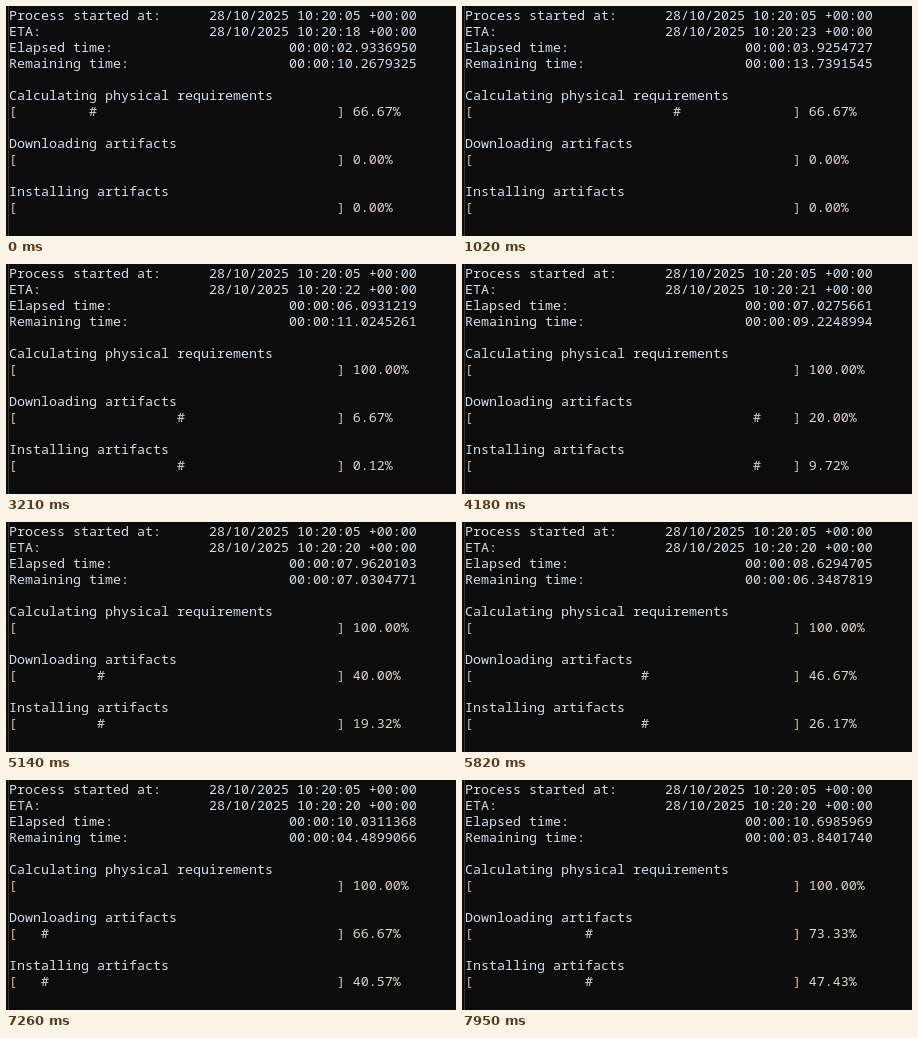
Write an HTML page that moves like this. It is 450x230 px and loops after 8 s.

```html
<!DOCTYPE html>
<html lang="en">
<head>
<meta charset="utf-8">
<title>Install progress</title>
<style>
  html, body { margin: 0; width: 100%; height: 100%; overflow: hidden; background: #0c0c0c; }
  svg { display: block; width: 450px; height: 230px; background: #0c0c0c; }
  text {
    font: 13.3333px "Noto Sans Mono", "DejaVu Sans Mono", monospace;
    font-variant-ligatures: none;
    white-space: pre;
    fill: #d2dee8;
  }
  .bar { fill: #e0d6c6; }
  .bracket { fill: #dcb98c; }
  #cursor { fill: #fff; mix-blend-mode: difference; }
</style>
</head>
<body>
<svg id="screen" viewBox="0 0 450 230">
  <rect x="2" width="1" height="230" fill="#333"/>
</svg>
<script>
const LOOP = 8000;
const REFRESH_MS = 68.53;
const BAR_WIDTH = 40;
const ARTIFACTS = 15;
const START_SECOND = 5.72;
const CALCULATED_AT = 4.3;
const DOWNLOADED_AT = 6.08;
const INSTALL_FROM = 6.0814;
const INSTALL_RATE = 1540.8; // thousandths of an artifact per second

// Elapsed seconds at a few refreshes; the clock runs evenly in between
const CLOCK = [[0, 2.933695], [33, 5.115606], [47, 6.0931219], [116, 10.6985969]];

const svg = document.getElementById("screen");
function make(tag, attrs, parent = svg) {
  const node = document.createElementNS(svg.namespaceURI, tag);
  for (const name in attrs) node.setAttribute(name, attrs[name]);
  return parent.appendChild(node);
}
const rows = Array.from({ length: 13 }, (_, i) => make("text", { x: 3, y: 14 + i * 16 }));
const cursor = make("rect", { id: "cursor", x: 3, y: 13, width: 8, height: 4 });

function elapsedAt(refresh) {
  const i = Math.max(1, CLOCK.findIndex(([r]) => r >= refresh));
  const [[r0, s0], [r1, s1]] = [CLOCK[i - 1], CLOCK[i]];
  return s0 + (s1 - s0) * (refresh - r0) / (r1 - r0);
}

// Downloads come in quickly at first, then slow down
function downloadedAt(elapsed) {
  const t = elapsed - DOWNLOADED_AT;
  return t < 0 ? 0 : Math.floor(1 + 3 * t - 0.15 * t * t) / ARTIFACTS;
}

function installedAt(elapsed) {
  const thousandths = Math.round((elapsed - INSTALL_FROM) * INSTALL_RATE);
  return Math.max(0, thousandths) / (ARTIFACTS * 1000);
}

const plain = text => [["", text]];
const field = (label, value) => plain(label + value.padStart(51 - label.length));
const span = seconds => "00:00:" + seconds.toFixed(7).padStart(10, "0");
const stamp = seconds =>
  `28/10/2025 10:20:${String(Math.floor(seconds)).padStart(2, "0")} +00:00`;

function bar(progress, elapsed) {
  const busy = progress > 0 && progress < 1;
  const at = Math.floor(elapsed * 16 + 2.94) % BAR_WIDTH;
  const inner = (busy ? " ".repeat(at) + "#" : "").padEnd(BAR_WIDTH);
  return [
    ["bracket", "["], ["bar", inner], ["bracket", "]"],
    ["bar", ` ${(progress * 100).toFixed(2)}%`]
  ];
}

function write(row, parts) {
  row.replaceChildren();
  for (const [style, text] of parts) make("tspan", { class: style }, row).textContent = text;
}

let shown = -1;
function render(ms) {
  const refresh = Math.min(116, Math.floor(ms / REFRESH_MS + 0.35));
  if (refresh === shown) return;
  shown = refresh;

  const elapsed = elapsedAt(refresh);
  const calculated = elapsed < CALCULATED_AT ? 2 / 3 : 1;
  const downloaded = downloadedAt(elapsed);
  const installed = installedAt(elapsed);
  const total = elapsed * 3 / (calculated + downloaded + installed);

  [
    field("Process started at:", stamp(START_SECOND)),
    field("ETA:", stamp(START_SECOND + total)),
    field("Elapsed time:", span(elapsed)),
    field("Remaining time:", span(total - elapsed)),
    plain(""),
    plain("Calculating physical requirements"),
    bar(calculated, elapsed),
    plain(""),
    plain("Downloading artifacts"),
    bar(downloaded, elapsed),
    plain(""),
    plain("Installing artifacts"),
    bar(installed, elapsed)
  ].forEach((parts, i) => write(rows[i], parts));

  cursor.style.visibility = refresh % 9 === 5 ? "visible" : "hidden";
}

const start = performance.now();
function tick() {
  render((performance.now() - start) % LOOP);
  requestAnimationFrame(tick);
}
tick();
</script>
</body>
</html>
```
